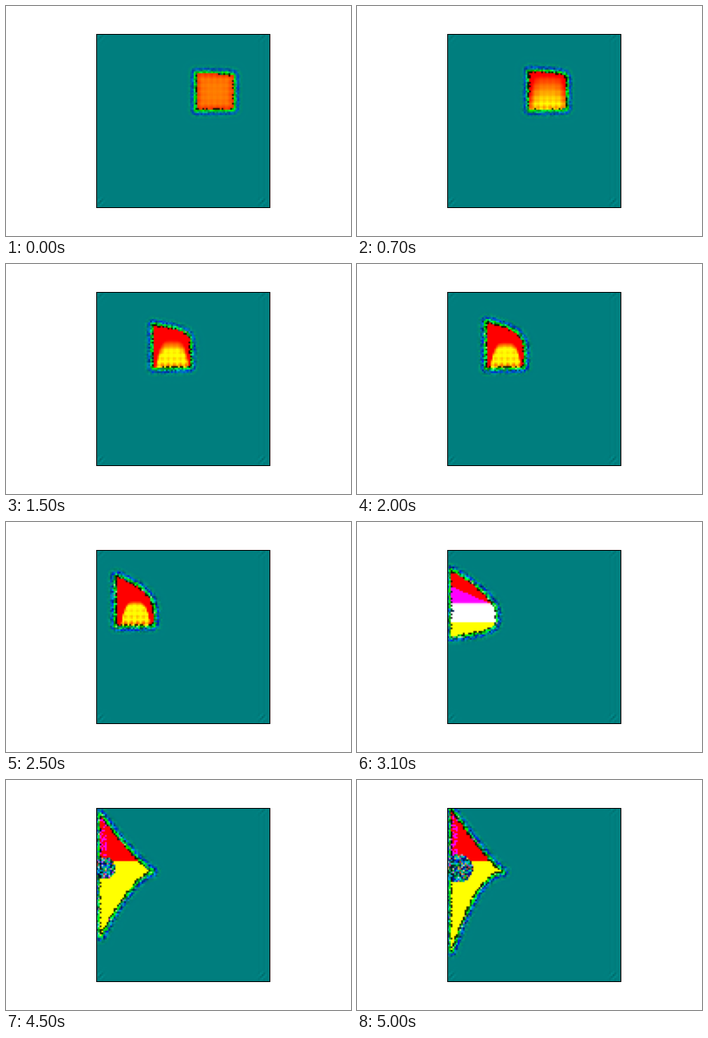
A matplotlib script for the animation above (5100 ms loop, 432 px wide and 288 px high).

```python
import numpy as np
import matplotlib.pyplot as plt
from matplotlib.animation import FuncAnimation

W, H, DPI = 432, 288, 72
FRAMES, STEP = 51, 100
N = 100
SIDE = 0.755 * H
LEFT, TOP = 0.5125 * W - SIDE / 2, 0.12 * H
TEAL = (0, 0.498, 0.498)
WALL, TIP_Y = 118, 115

cell = (np.arange(N) + 0.5) * SIDE / N
X, Y = np.meshgrid(LEFT + cell, TOP + cell)
NOISE = np.random.default_rng(4).random((3, N, N))


def ease(t, start, end):
    s = np.clip((t - start) / (end - start), 0, 1)
    return s * s * (3 - 2 * s)


def wave(d, length):
    return np.cos(2 * np.pi * d / length)


def outline(t):
    """A square that speeds up to the left, then splashes along the wall."""
    left = max(238 - 30 * t - 4 * t * t, WALL)
    width = 46 + 18 * ease(t, 2.5, 3.7)
    top = 85 - 47 * (t / 5) ** 1.5
    bottom = 130 + 37 * max(t - 2.75, 0)
    # A small power makes a pointed side, a large one a square side
    upper = 1 / min(0.02 + 0.06 * t * t, 1.25)
    lower = 1 / (0.02 + 0.95 * max(t - 2.9, 0))
    q = 0.5 - 0.5 * np.cos(np.linspace(0, np.pi, 18))
    over = np.column_stack([left + width * (1 - q ** upper), TIP_Y + (top - TIP_Y) * q])
    under = np.column_stack([left + width * (1 - q ** lower), TIP_Y + (bottom - TIP_Y) * q])
    return np.vstack([over[::-1], under[1:]])


def signed_distance(pts):
    """Distance to the outline, negative inside."""
    dist = np.full(X.shape, 1e9)
    inside = np.zeros(X.shape, bool)
    for (x0, y0), (x1, y1) in zip(pts, np.roll(pts, -1, axis=0)):
        dx, dy = x1 - x0, y1 - y0
        s = np.clip(((X - x0) * dx + (Y - y0) * dy) / (dx * dx + dy * dy + 1e-9), 0, 1)
        dist = np.minimum(dist, np.hypot(X - x0 - s * dx, Y - y0 - s * dy))
        if dy:
            cross = (y0 > Y) != (y1 > Y)
            inside ^= cross & (X < x0 + (Y - y0) * dx / dy)
    return np.where(inside, -dist, dist)


def make_backdrop():
    """Teal field with faint ripples at the right side and in the corners."""
    img = np.ones((N, N, 3)) * TEAL
    strip = 0.012 * wave(X - 319, 6) * (X > 315)
    corner = np.zeros_like(X)
    for cx in (118, 320):
        for cy, power in ((40, 0.06), (245, 0.1)):
            near = np.exp(-((X - cx) ** 2 + (Y - cy) ** 2) / 22)
            corner += power * near * wave(X - cx + Y - cy, 8)
    img[..., 1:] += (strip - corner)[..., None]
    return img


BACKDROP = make_backdrop()


def paint_fringe(img, d, rough, wob):
    fade = np.exp(-(np.maximum(d, 0) / 6.5) ** 2)
    img[..., 1] += fade * (0.45 * wave(d - 2, 8) + rough * wob[0])
    img[..., 2] += fade * (0.5 * wave(d - 6, 9) + rough * wob[1])
    img[..., 0] = 0.6 * ((d < 3) & (wob[1] > 1.1 - 0.3 * rough))


def paint_core(img, d, t, left, wob):
    flight = 1 - ease(t, 2.6, 3.0)
    slope = 0.03 * t + 0.009 * t ** 3
    mid = 102 + 32 * t * flight * ((X - left - 24) / 24) ** 4
    green = np.clip(0.49 + slope * (Y - mid), 0, 1)
    lines = wave(X - left, 7.5) + wave(130 - Y, 7.5)
    green *= 1 + flight * (0.12 + 0.1 * t) * lines * np.exp(d / 12)
    green -= 0.35 * flight * np.exp(d / 4)

    # The rebound spreads from the wall and closes again
    shut = 35 * ease(t, 3.9, 5)
    blue = ((Y > 81 + shut + 0.45 * (X - WALL)) & (Y < 125 - shut)
            & (X < WALL + 300 * (t - 2.9)))
    blue |= (X < 126) & (Y < 95) & (wob[1] > 1 - ease(t, 3.9, 5))
    color = np.stack([np.ones_like(X), green, blue], axis=-1)
    img[d < 0] = color[d < 0]


def paint_hole(img, t, wob):
    grow = 8 * (t - 3.9)
    r = max(9 + grow, 0)
    hole = (X - WALL - max(grow, 0)) ** 2 + (Y - 111) ** 2 < r * r
    color = np.stack([0.8 * (wob[2] > 0.85),
                      0.45 + 0.4 * wob[0],
                      0.5 + 0.4 * wob[1]], axis=-1)
    img[hole] = color[hole]


def render(t):
    pts = outline(t)
    d = signed_distance(pts)
    wob = np.sin(2 * np.pi * NOISE + 5 * t)
    rough = 0.2 + 0.1 * min(t, 3)
    img = BACKDROP.copy()
    paint_fringe(img, d, rough, wob)
    paint_core(img, d, t, pts[:, 0].min(), wob)
    paint_hole(img, t, wob)
    specks = (abs(d) < 1.3) & (wob[2] > 1 - 2 * rough)
    img[specks] *= 0.15
    return np.clip(img, 0, 1)


fig = plt.figure(figsize=(W / DPI, H / DPI), dpi=DPI, facecolor="white")
ax = fig.add_axes([LEFT / W, 1 - (TOP + SIDE) / H, SIDE / W, SIDE / H])
ax.set_xticks([])
ax.set_yticks([])
ax.spines[:].set_linewidth(1)
picture = ax.imshow(render(0), interpolation="hanning", aspect="auto",
                    extent=(LEFT, LEFT + SIDE, TOP + SIDE, TOP))


def draw(i):
    picture.set_data(render(i * STEP / 1000))
    return [picture]


anim = FuncAnimation(fig, draw, frames=FRAMES, interval=STEP, repeat=True)
plt.show()
```
